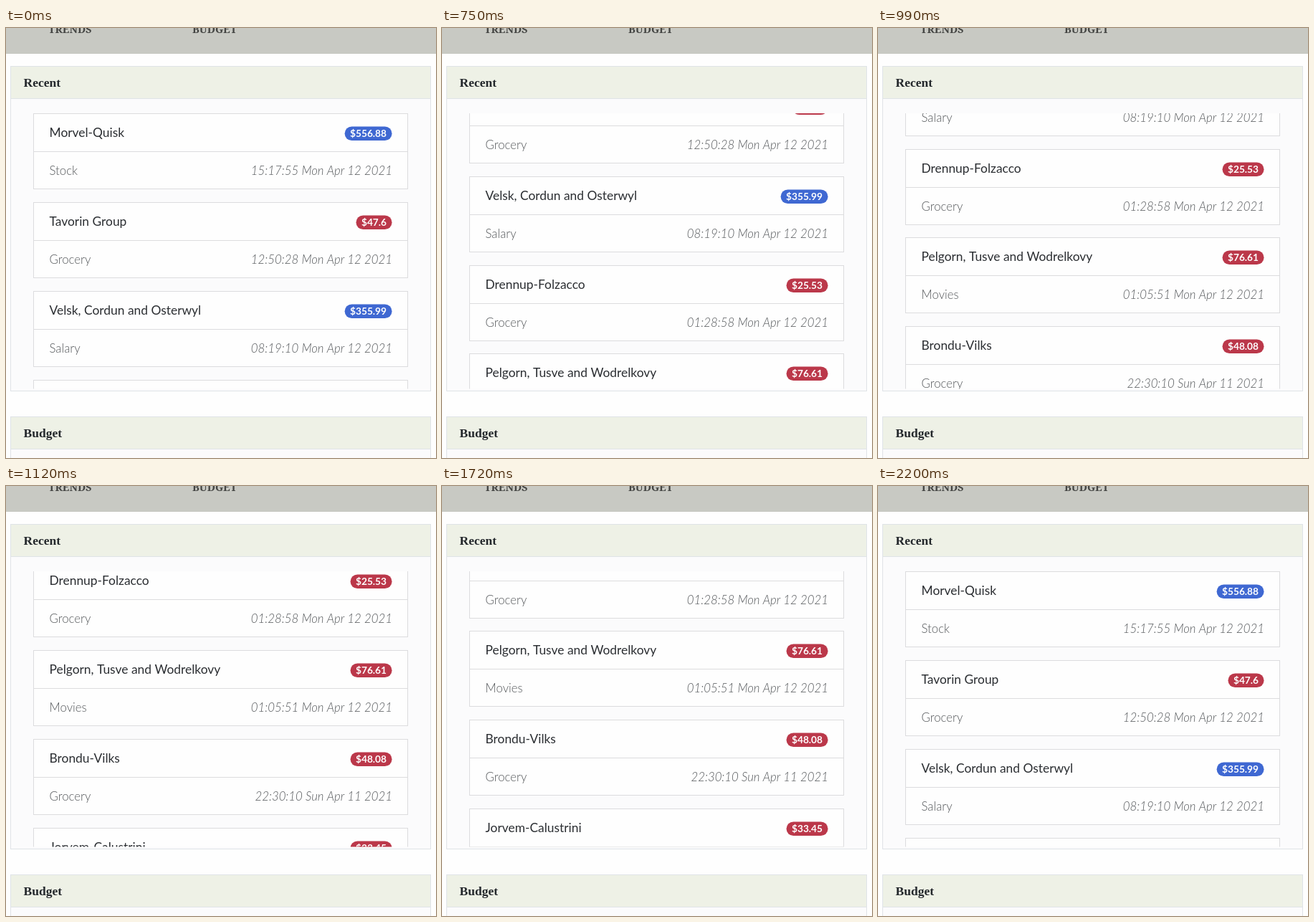
Animation of 600x600 px, one loop 2.32 s. Source, as an HTML page with a canvas:

```html
<!DOCTYPE html>
<html lang="en">
<head>
<meta charset="utf-8">
<title>Recent transactions</title>
<style>
  html, body { margin: 0; width: 100%; height: 100%; overflow: hidden; background: #fefefe; }
  canvas { display: block; width: 600px; height: 600px; }
</style>
</head>
<body>
<canvas id="stage" width="600" height="600"></canvas>
<script>
const ctx = document.getElementById('stage').getContext('2d');

const LOOP = 2320;
const STEP = 60;
const PITCH = 123.8;
const BLUE = '#3f68d2';
const RED = '#bb384a';
const SANS = 'Lato, sans-serif';
const HEADING = 'bold 17.5px "Liberation Serif", serif';

const entries = [
  ['Morvel-Quisk', '$556.88', BLUE, 'Stock', '15:17:55 Mon Apr 12 2021'],
  ['Tavorin Group', '$47.6', RED, 'Grocery', '12:50:28 Mon Apr 12 2021'],
  ['Velsk, Cordun and Osterwyl', '$355.99', BLUE, 'Salary', '08:19:10 Mon Apr 12 2021'],
  ['Drennup-Folzacco', '$25.53', RED, 'Grocery', '01:28:58 Mon Apr 12 2021'],
  ['Pelgorn, Tusve and Wodrelkovy', '$76.61', RED, 'Movies', '01:05:51 Mon Apr 12 2021'],
  ['Brondu-Vilks', '$48.08', RED, 'Grocery', '22:30:10 Sun Apr 11 2021'],
  ['Jorvem-Calustrini', '$33.45', RED, 'Grocery', '22:12:05 Sun Apr 11 2021']
];

// Scroll keys: time, offset, speed in px per step
const down = [[510, 17.4, 28], [750, 160, 40], [990, 322, 36], [1300, 436, 4]];
const up = [[1720, 412, -48], [1960, 151.3, -60], [2200, 0, -12]];

function along(keys, t) {
  let i = 0;
  while (i < keys.length - 2 && t >= keys[i + 1][0]) i++;
  const [t0, p0, v0] = keys[i];
  const [t1, p1, v1] = keys[i + 1];
  const u = (t - t0) / (t1 - t0);
  const span = (t1 - t0) / STEP;
  const w = 1 - u;
  return p0 * w * w * (1 + 2 * u) + p1 * u * u * (3 - 2 * u)
    + span * u * w * (v0 * w - v1 * u);
}

function snap(t, start) {
  return start + Math.floor((t - start) / STEP) * STEP;
}

function scrollAt(t) {
  if (t < 510) return 0;
  if (t < 1300) return along(down, Math.min(1230, snap(t, 510)));
  if (t < 1720) return 436;
  if (t < 2200) return along(up, snap(t, 1720));
  return 0;
}

function text(str, x, y, font, color, align = 'left') {
  ctx.font = font;
  ctx.fillStyle = color;
  ctx.textAlign = align;
  ctx.fillText(str, x, y);
}

function box(x, y, w, h, fill, stroke) {
  ctx.fillStyle = fill;
  ctx.fillRect(x, y, w, h);
  ctx.strokeStyle = stroke;
  ctx.strokeRect(x + 0.5, y + 0.5, w, h);
}

function panel(y, h, title) {
  box(6, y, 586, h, '#fbfbfc', '#dfe3e7');
  box(6, y, 586, 45, '#eef1e6', '#dfe3e7');
  text(title, 24.5, y + 29, HEADING, '#24282c');
}

function badge(label, y, color) {
  ctx.font = `bold 13.7px ${SANS}`;
  const w = ctx.measureText(label).width + 15;
  ctx.fillStyle = color;
  ctx.beginPath();
  ctx.roundRect(538.5 - w, y, w, 19.6, 9.8);
  ctx.fill();
  text(label, 531, y + 14.7, ctx.font, '#fff', 'right');
}

function card([name, amount, color, kind, date], y) {
  box(38, y, 522, 105, '#fefefe', '#dcdcde');
  ctx.fillStyle = '#dcdcde';
  ctx.fillRect(38, y + 53, 522, 1);
  text(name, 60.5, y + 33, `17.4px ${SANS}`, '#2b2e32');
  badge(amount, y + 18.4, color);
  text(kind, 60.5, y + 85.5, `300 16.8px ${SANS}`, '#55585b');
  text(date, 539, y + 85.5, `italic 300 16.8px ${SANS}`, '#55585b', 'right');
}

function draw(t) {
  ctx.fillStyle = '#fefefe';
  ctx.fillRect(0, 0, 600, 600);
  ctx.fillStyle = '#c8c9c3';
  ctx.fillRect(0, 0, 600, 36);
  const nav = 'bold 14.6px "Noto Serif", serif';
  text('TRENDS', 59, 7, nav, '#444543');
  text('BUDGET', 260, 7, nav, '#444543');

  panel(53, 453, 'Recent');
  panel(542, 453, 'Budget');

  ctx.save();
  ctx.beginPath();
  ctx.rect(37, 119, 525, 384.5);
  ctx.clip();
  const offset = scrollAt(t);
  entries.forEach((entry, i) => {
    const y = Math.round(119.2 + i * PITCH - offset);
    if (y > 0 && y < 504) card(entry, y);
  });
  ctx.restore();
}

const start = performance.now();
function tick() {
  draw((performance.now() - start) % LOOP);
  requestAnimationFrame(tick);
}
tick();
</script>
</body>
</html>
```
